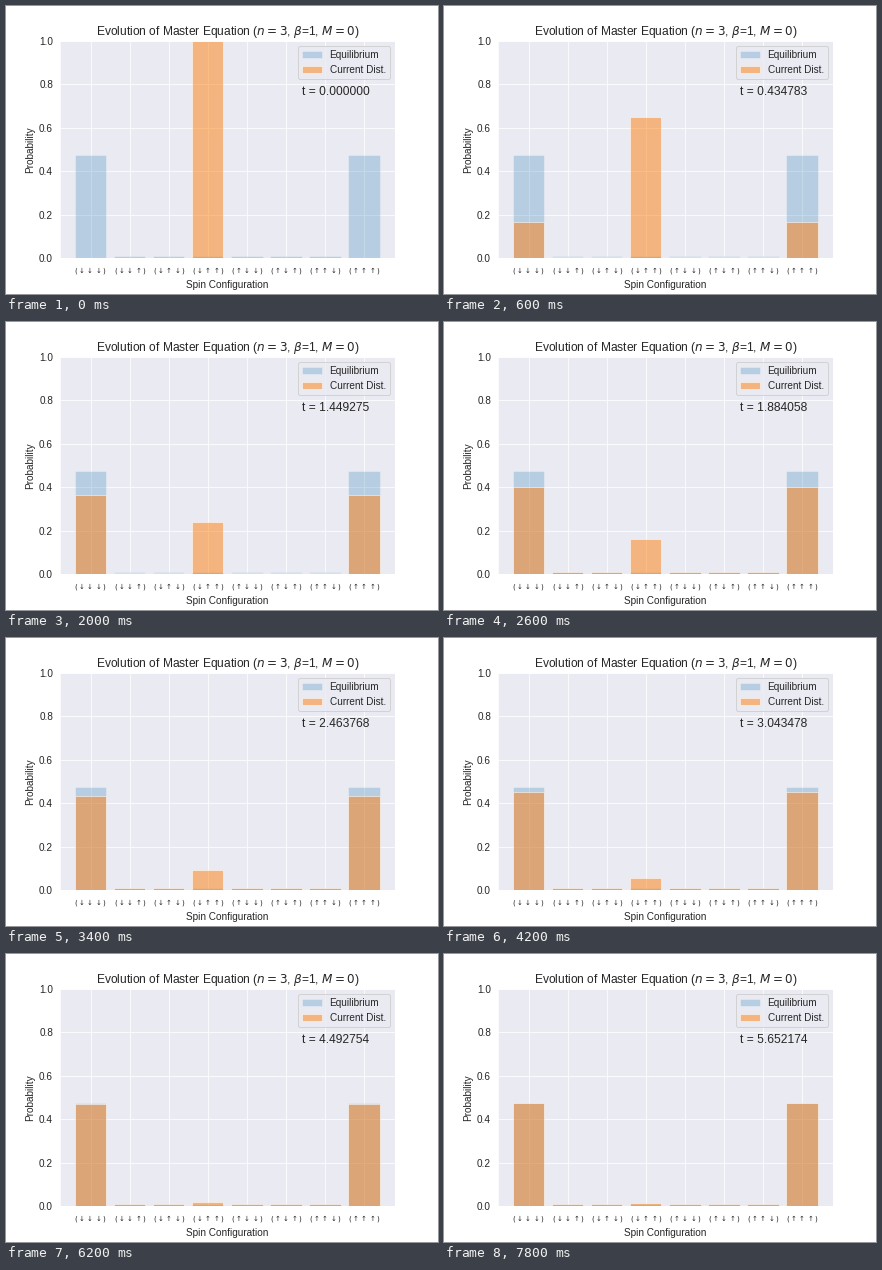
These frames come from a looping animation (432 by 288 pixels, 8000 ms). A matplotlib script:

```python
from itertools import product

import matplotlib.pyplot as plt
import numpy as np
from matplotlib.animation import FuncAnimation

N, BETA = 3, 1
FRAMES, INTERVAL = 40, 200
DT = 10 / 69
START = 3  # index of the initial configuration

INK = "0.15"
plt.rcParams.update({
    "figure.facecolor": "white",
    "axes.facecolor": "#EAEAF2",
    "axes.edgecolor": "white",
    "axes.labelcolor": INK,
    "axes.axisbelow": True,
    "axes.grid": True,
    "grid.color": "white",
    "grid.linestyle": "-",
    "text.color": INK,
    "xtick.color": INK,
    "ytick.color": INK,
    "xtick.bottom": False,
    "ytick.left": False,
    "patch.edgecolor": "white",
    "patch.force_edgecolor": True,
    "font.family": ["Liberation Sans"],
    "font.size": 10,
})


def spin_label(spins):
    arrows = "".join(r"\uparrow " if s > 0 else r"\downarrow " for s in spins)
    return f"$({arrows})$"


def energy(spins):
    return -sum(s * spins[(i + 1) % N] for i, s in enumerate(spins))


states = list(product((-1, 1), repeat=N))
weights = np.exp([-BETA * energy(s) for s in states])
equilibrium = weights / weights.sum()
initial = np.eye(len(states))[START]


def distribution(t):
    """Exponential relaxation towards equilibrium at unit rate."""
    return equilibrium + (initial - equilibrium) * np.exp(-t)


fig, ax = plt.subplots(figsize=(6, 4), dpi=72)
fig.subplots_adjust(left=0.125, right=0.9, bottom=0.125, top=0.88)
x = np.arange(len(states))
ax.bar(x, equilibrium, color="C0", alpha=0.25, label="Equilibrium")
bars = ax.bar(x, initial, color="C1", alpha=0.5, label="Current Dist.")
ax.set_xlim(-0.79, 7.79)
ax.set_ylim(0, 1)
ax.set_xticks(x, [spin_label(s) for s in states], fontsize=7)
ax.set_xlabel("Spin Configuration")
ax.set_ylabel("Probability")
ax.set_title(rf"Evolution of Master Equation ($n={N}$, $\beta$={BETA}, $M=0$)",
             fontsize=12)
ax.legend(loc="upper right")
clock = ax.text(5.4, 0.75, "", fontsize=12)


def update(frame):
    t = frame * DT
    for bar, p in zip(bars, distribution(t)):
        bar.set_height(p)
    clock.set_text(f"t = {t:.6f}")
    return [*bars, clock]


anim = FuncAnimation(fig, update, frames=FRAMES, interval=INTERVAL,
                     repeat=True, repeat_delay=0)
plt.show()
```
